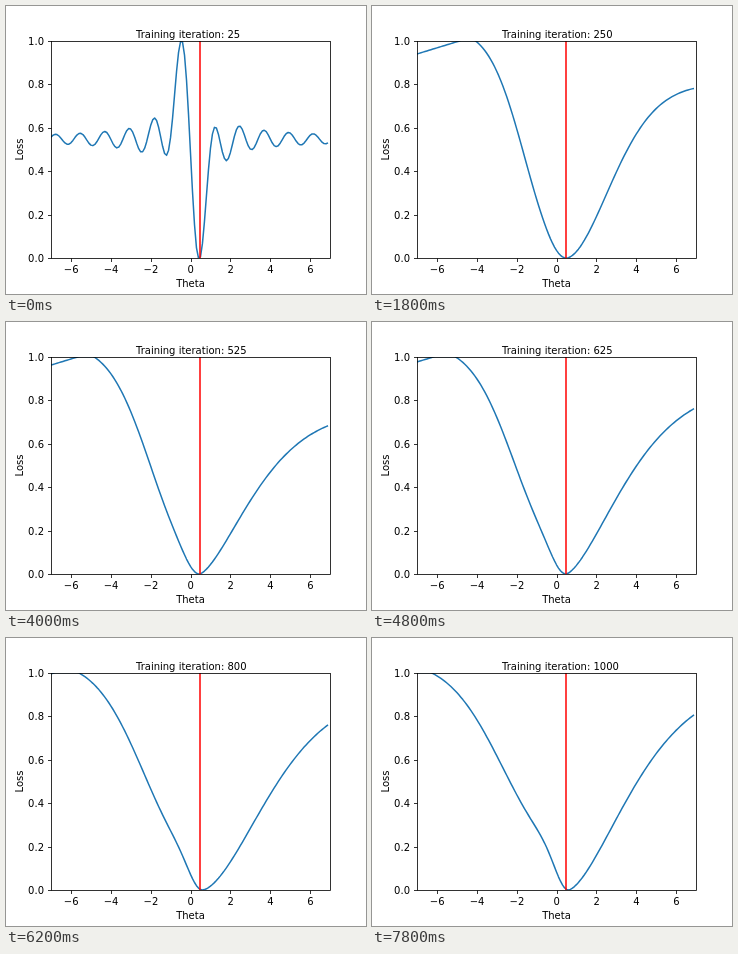
Recreate the animation shown at these times as an HTML page. Size 360 by 288 pixels, loop 8000 ms.

```html
<!DOCTYPE html>
<html lang="en">
<head>
<meta charset="utf-8">
<title>Loss curve during training</title>
<style>
  html, body { margin: 0; width: 100%; height: 100%; overflow: hidden; background: #fff; }
  svg { display: block; width: 360px; height: 288px; font: 10px "DejaVu Sans", sans-serif; }
  .line { fill: none; stroke-width: 1.5; stroke-linejoin: round; }
  .axis { fill: none; stroke: #000; stroke-width: .8; }
</style>
</head>
<body>
<svg viewBox="0 0 360 288">
  <clipPath id="plot"><rect x="45" y="35" width="279" height="217"/></clipPath>
  <g clip-path="url(#plot)">
    <path id="curve" class="line" stroke="#1f77b4"/>
    <path class="line" stroke="#f00" d="M194 35V252"/>
  </g>
  <rect class="axis" x="45.5" y="35.5" width="279" height="217"/>
  <g id="ticks"></g>
  <text x="184.5" y="281" text-anchor="middle">Theta</text>
  <text transform="translate(17 143.5) rotate(-90)" text-anchor="middle">Loss</text>
  <text id="title" x="130" y="32"></text>
</svg>
<script>
const STEP_MS = 200, STEPS = 40;
const px = theta => 45 + (theta + 7) * 279 / 14;
const py = loss => 252 - loss * 217.44;
const mix = (a, b, t) => a + (b - a) * t;
const $ = id => document.getElementById(id);

// Key shapes of the valley: lowest point, width of the left wall, where the
// left plateau starts to sink, and height, width and power of the right wall.
const keys = [
  { step: 9,  low: .5,  left: 2.78, plateau: -4.8, height: .8,  right: 3.1,  power: 1.8 },
  { step: 16, low: .8,  left: 3,    plateau: -4.2, height: .74, right: 3.37, power: 1.95 },
  { step: 20, low: .45, left: 3.25, plateau: -5.6, height: .75, right: 3.6,  power: 1.5 },
  { step: 27, low: .5,  left: 3.55, plateau: -6.5, height: .95, right: 4.15, power: 1.53 },
  { step: 31, low: .6,  left: 3.85, plateau: -6.8, height: .9,  right: 4.33, power: 1.65 },
  { step: 39, low: .6,  left: 4.3,  plateau: -7,   height: .95, right: 4.19, power: 1.55 }
];

// Climbs from 0 towards 1, reaching 63 % at the given width.
const rise = (distance, width, power) => 1 - Math.exp(-((distance / width) ** power));
const sinc = v => Math.abs(v) < 1e-6 ? 1 : Math.sin(v) / v;

// Early landscape: a steep dip with decaying ripples on both sides.
function ripple(x) {
  const w = 5.1, a = .308;
  return .547 - .38 * (sinc(w * (x - a)) - sinc(w * (x + a)))
       - .25 * x * Math.exp(-x * x / .96) - .064 * Math.exp(-x * x / .8);
}

// Later landscape: one wide valley whose left wall grows a shoulder.
function valley(x, k) {
  if (x > k.low) return k.height * rise(x - k.low, k.right, k.power);
  const d = k.low - x, shoulder = .2 * k.step / (STEPS - 1);
  const wall = shoulder * rise(d, .9, 2) + (1.05 - shoulder) * rise(d, k.left, 2.2);
  return Math.min(1, wall) - .028 * Math.max(0, k.plateau - x);
}

function shapeAt(step) {
  const i = Math.max(1, keys.findIndex(k => k.step >= step));
  const a = keys[i - 1], b = keys[i], t = (step - a.step) / (b.step - a.step);
  return Object.fromEntries(Object.keys(a).map(name => [name, mix(a[name], b[name], t)]));
}

// The ripples stretch out around the dip and settle into the first valley.
function lossFunction(step) {
  const settled = Math.sqrt(Math.min(1, step / keys[0].step));
  const shape = shapeAt(Math.max(step, keys[0].step)), centre = .46;
  return x => {
    const early = ripple(centre + (x - centre) / 5.8 ** settled);
    return mix(early, valley(x, shape), settled ** 2);
  };
}

function drawTicks() {
  let out = "";
  for (let v = -6; v <= 6; v += 2) {
    const x = Math.round(px(v)) + .5;
    out += `<path class="axis" d="M${x} 252.5v3.5"/>
      <text x="${px(v) + .3}" y="267" text-anchor="middle">${String(v).replace("-", "\u2212")}</text>`;
  }
  for (let i = 0; i <= 5; i++) {
    const y = Math.round(py(i / 5)) + .5;
    out += `<path class="axis" d="M45.5 ${y}h-3.5"/>
      <text x="38" y="${y + 3.5}" text-anchor="end">${(i / 5).toFixed(1)}</text>`;
  }
  $("ticks").innerHTML = out;
}

let shown = -1;
function frame(now) {
  const step = Math.floor(now / STEP_MS) % STEPS;
  if (step !== shown) {
    shown = step;
    const lossAt = lossFunction(step);
    const points = Array.from({ length: 140 }, (_, i) => {
      const x = -7 + i / 10;
      const loss = Math.min(1, Math.max(0, lossAt(x)));
      return px(x).toFixed(2) + " " + py(loss).toFixed(2);
    });
    $("curve").setAttribute("d", "M" + points.join("L"));
    $("title").textContent = "Training iteration: " + 25 * (step + 1);
  }
  requestAnimationFrame(() => frame(performance.now() - start));
}

drawTicks();
const start = performance.now();
frame(0);
</script>
</body>
</html>
```
